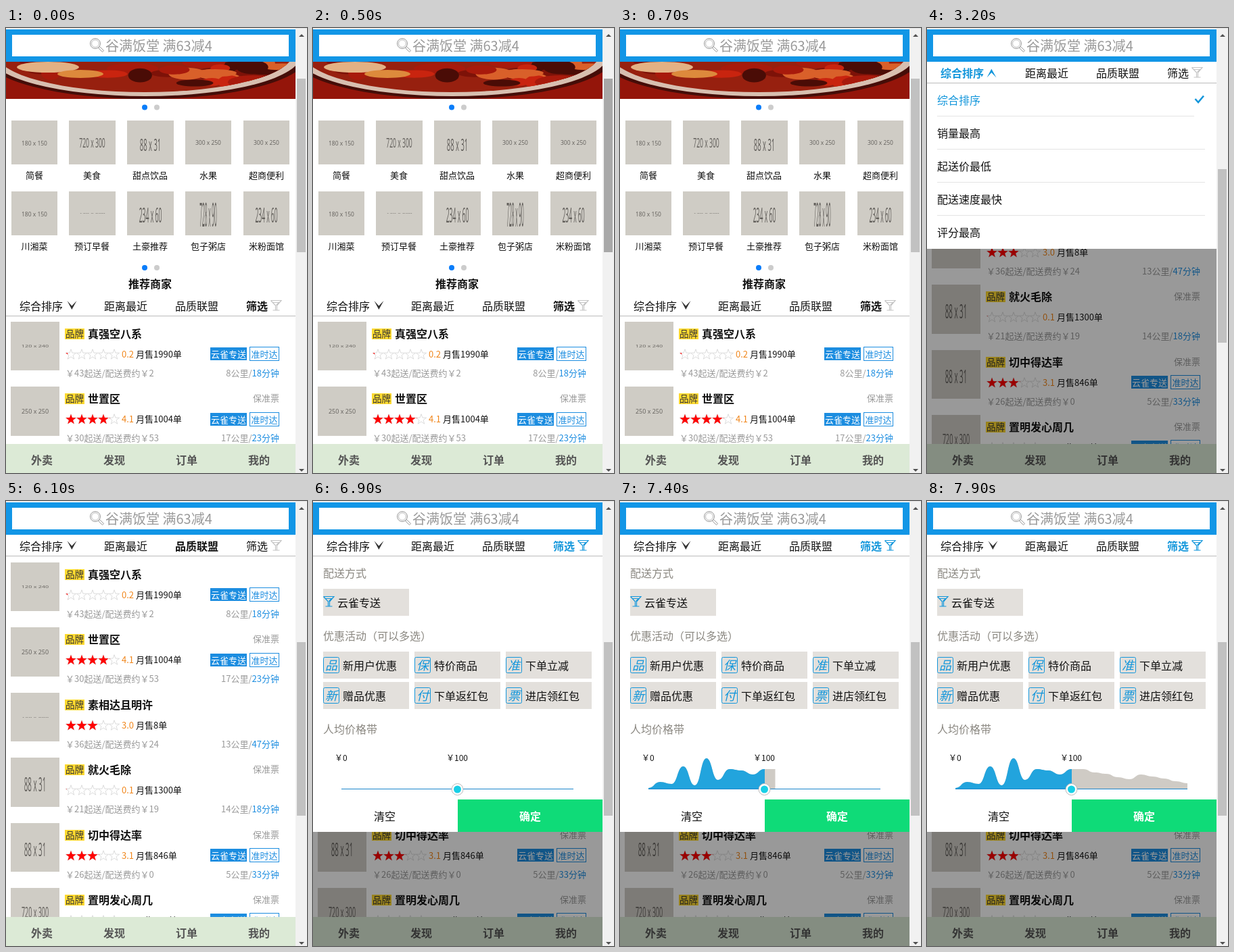
An HTML page that plays this animation: 445x659 px, repeating every 8000 ms.

```html
<!DOCTYPE html>
<html lang="zh-CN">
<head>
<meta charset="utf-8">
<title>外卖</title>
<style>
html, body { margin: 0; width: 100%; height: 100%; overflow: hidden; background: #fff; }
svg { display: block; }
text { font-family: "Noto Sans CJK SC", "Noto Sans CJK", "Noto Sans", sans-serif; white-space: pre; }
.ph { font-family: "Open Sans", "Noto Sans", sans-serif; fill: #625f5b; }
</style>
</head>
<body>
<svg id="stage" width="445" height="659" viewBox="0 0 445 659"></svg>
<script>
const LOOP = 8000;
const BLUE = '#1296db', GRAY = '#999', INK = '#111';

const rect = (x, y, w, h, fill, more = '') =>
  `<rect x="${x}" y="${y}" width="${w}" height="${h}" fill="${fill}" ${more}/>`;
const dot = (x, y, r, fill, more = '') => `<circle cx="${x}" cy="${y}" r="${r}" fill="${fill}" ${more}/>`;
const oval = (x, y, rx, ry, fill) => `<ellipse cx="${x}" cy="${y}" rx="${rx}" ry="${ry}" fill="${fill}"/>`;
const line = (d, color, w = 1) => `<path d="${d}" fill="none" stroke="${color}" stroke-width="${w}"/>`;
const shape = (d, fill) => `<path d="${d}" fill="${fill}"/>`;
const at = (x, y, body) => `<g transform="translate(${x} ${y})">${body}</g>`;
const layer = (id, body) => `<g id="${id}">${body}</g>`;

// cy is the middle of the glyphs
function text(s, x, cy, { size = 16, fill = INK, bold = 0, anchor = 'start', more = '' } = {}) {
  return `<text x="${x}" y="${cy + size * 0.38}" font-size="${size}" fill="${fill}"
    font-weight="${bold ? 700 : 400}" text-anchor="${anchor}" ${more}>${s}</text>`;
}

// placeholder picture of w x h squeezed into a bw x bh box
function placeholder(x, y, bw, bh, w, h) {
  const size = Math.max(12, Math.min(0.125 * w, 0.77 * h));
  return at(x, y, rect(0, 0, bw, bh, '#cfccc5') +
    `<g transform="scale(${bw / w} ${bh / h})"><text class="ph" x="${w / 2}" y="${h / 2 + size * 0.36 + 1.5}"
      font-size="${size}" text-anchor="middle">${w} x ${h}</text></g>`);
}

function starPath(cx, cy, r) {
  let d = '';
  for (let i = 0; i < 10; i++) {
    const a = -Math.PI / 2 + i * Math.PI / 5, k = i % 2 ? r * 0.4 : r;
    d += (i ? 'L' : 'M') + (cx + k * Math.cos(a)).toFixed(2) + ' ' + (cy + k * Math.sin(a)).toFixed(2);
  }
  return d + 'Z';
}

function stars(rate, id) {
  let d = '';
  for (let i = 0; i < 5; i++) d += starPath(96 + i * 16, 48.7, 8);
  return line(d, '#d4d4d4', 0.8) +
    `<clipPath id="${id}"><rect x="88" y="38" width="${rate * 16}" height="20"/></clipPath>
     <path d="${d}" fill="#f00" clip-path="url(#${id})"/>`;
}

const funnel = (x, y, color) => at(x, y,
  line('M0.5 1H16L9.5 8.5V15M0.5 1L7.5 8.5V15M3.5 15.5H13.5M4 4H12.5L8.5 8', color, 1.2));

function shop([name, w, h, rate, sales, badges, ticket, min, fee, km, mins], i) {
  const s = { size: 13 }, g = { size: 13, fill: GRAY };
  // rows have a fractional pitch, boxes snap to whole pixels
  const top = Math.round(i * 96.4), snap = y => Math.round(i * 96.4 + y) - top;
  let out = placeholder(7, 0, 72, snap(72.4), w, h) +
    rect(87, 10, 29, 16, '#ffd930') + text('品牌', 88, 17.5, { size: 13.5, fill: '#333' }) +
    text(name, 121, 18, { bold: 1 }) +
    stars(rate, 'rate' + i) +
    text(rate.toFixed(1), 171, 48, { size: 13, fill: '#f08519' }) +
    text(`月售${sales}单`, 192, 48, s) +
    text(`￥${min}起送/配送费约￥${fee}`, 88, 76, g) +
    text(`${km}公里/<tspan fill="#1c8de0">${mins}分钟</tspan>`, 404, 76, { ...g, anchor: 'end' });
  if (ticket) out += text('保准票', 404, 17, { ...g, anchor: 'end' });
  if (badges) out += at(0, snap(38.3), rect(302, 0, 54, 19, '#1c8de0') +
    text('云雀专送', 303, 9.7, { size: 13, fill: '#fff' }) +
    rect(360.5, -0.5, 43, 20, 'none', 'stroke="#1c8de0"') +
    text('准时达', 362.5, 9.7, { size: 13, fill: '#1c8de0' }));
  return at(0, top, out);
}

const shops = [
  ['真强空八系', 120, 240, 0.2, 1990, 1, 0, 43, 2, 8, 18],
  ['世置区', 250, 250, 4.1, 1004, 1, 1, 30, 53, 17, 23],
  ['素相达且明许', 120, 600, 3, 8, 0, 0, 36, 24, 13, 47],
  ['就火毛除', 88, 31, 0.1, 1300, 0, 1, 21, 19, 14, 18],
  ['切中得达率', 88, 31, 3.1, 846, 1, 1, 26, 0, 5, 33],
  ['置明发心周几', 720, 300, 0.3, 620, 1, 1, 28, 6, 9, 25]
];

const kinds = [
  ['简餐', 180, 150], ['美食', 720, 300], ['甜点饮品', 88, 31], ['水果', 300, 250], ['超商便利', 300, 250],
  ['川湘菜', 180, 150], ['预订早餐', 120, 600], ['土豪推荐', 234, 60], ['包子粥店', 728, 90], ['米粉面馆', 234, 60]
];

const pager = y => dot(205, y, 4, '#0a7dfa') + dot(223, y, 4, '#ccc');

// a dish on a plate, seen as a few flat patches
function photo() {
  let seed = 7;
  const rnd = () => (seed = seed * 16807 % 2147483647) / 2147483647;
  const tones = ['#c9240f', '#7d1208', '#d9602a', '#4a0c06', '#a81a0c'];
  let food = '';
  for (let i = 0; i < 30; i++) {
    food += oval(20 + rnd() * 390, 50 + rnd() * 34, 14 + rnd() * 26, 4 + rnd() * 7, tones[i % 5]);
  }
  return `<clipPath id="strip"><rect x="0" y="50" width="428" height="55"/></clipPath>
    <clipPath id="dish"><ellipse cx="205" cy="38" rx="219" ry="57"/></clipPath>
    <g clip-path="url(#strip)">${rect(0, 50, 428, 55, '#94150a') +
      oval(207, 42, 238, 63, '#450d08') + oval(206, 40, 230, 61, '#d8bfb0')}
    <g clip-path="url(#dish)">${rect(0, 50, 428, 55, '#97200f') + food +
      oval(62, 58, 46, 8, '#e3b184') + oval(110, 68, 34, 6, '#dd8a3c')}</g></g>`;
}

function home() {
  let out = photo() + pager(117.5) + pager(355);
  const size = 428 * 0.16;
  kinds.forEach(([name, w, h], i) => {
    const left = 7.6 + (i % 5) * 85.8, x = Math.round(left), y = i < 5 ? 137 : 242;
    out += placeholder(x, y, Math.round(left + size) - x, 65, w, h) +
      text(name, x + 34, y + 81, { size: 13, anchor: 'middle' });
  });
  return out + text('推荐商家', 213, 379, { bold: 1, anchor: 'middle' });
}

// bold: index of the chosen tab, open: index of the tab with its panel down
function bar(y, bold, open) {
  const tabs = [['综合排序', 20], ['距离最近', 145], ['品质联盟', 250], ['筛选', 355]];
  let out = rect(0, 0, 428, 30, '#fff') + rect(0, 29, 428, 1, '#bbb');
  tabs.forEach(([name, x], i) => {
    out += text(name, x, 15, { bold: i === bold || i === open, fill: i === open ? BLUE : INK });
  });
  out += open === 0
    ? shape('M88.5 21.5L95.3 8.5L102.5 21.5L95.3 14Z', BLUE)
    : shape('M90.5 7L97.3 14.5L104.5 7L97.3 20Z', '#333');
  return at(0, y, out + funnel(391, 5.5, open === 3 ? BLUE : '#c4c4c4'));
}

function sortPanel() {
  let out = rect(0, 82, 428, 245, '#fff');
  ['综合排序', '销量最高', '起送价最低', '配送速度最快', '评分最高'].forEach((name, i) => {
    out += text(name, 15, 106.5 + i * 49, { fill: i ? INK : BLUE });
    if (i < 4) out += rect(15, 130 + i * 49, i ? 396 : 380, 1, '#e4e4e4');
  });
  return out + line('M396.5 105L401 110L409 100.5', BLUE, 2.6);
}

const left = 42, step = 343 / 20, base = 426;
const heights = [1, 10, 7, 33, 5, 45, 13, 29, 27, 21, 29, 29, 24, 22, 17, 14, 21, 18, 15, 11, 8];

function chart() {
  let d = `M${left} ${base}V${base - heights[0]}`;
  for (let i = 1; i < heights.length; i++) {
    const x = left + i * step, mid = x - step / 2;
    d += `C${mid} ${base - heights[i - 1]} ${mid} ${base - heights[i]} ${x} ${base - heights[i]}`;
  }
  d += `V${base}Z`;
  return `<clipPath id="reveal"><rect id="shown" x="42" y="370" width="0" height="57"/></clipPath>
    <clipPath id="chosen"><rect x="42" y="370" width="172" height="57"/></clipPath>
    <g clip-path="url(#reveal)"><path d="${d}" fill="#cfcbc5"/>
    <path d="${d}" fill="#22a4dd" clip-path="url(#chosen)"/></g>`;
}

function filterPanel() {
  const head = { fill: '#8a8780' };
  let out = rect(0, 82, 428, 408, '#fff') +
    text('配送方式', 15, 106.5, head) +
    rect(15, 130, 127, 40, '#e3e0dc') + funnel(15, 140.5, BLUE) + text('云雀专送', 36, 150.5) +
    text('优惠活动（可以多选）', 15, 199.5, head);
  [['品', '新用户优惠'], ['保', '特价商品'], ['准', '下单立减'],
   ['新', '赠品优惠'], ['付', '下单返红包'], ['票', '进店领红包']].forEach(([mark, name], i) => {
    out += at(15 + (i % 3) * 135, i < 3 ? 223 : 268,
      rect(0, 0, 127, 40, '#e3e0dc') +
      rect(0.5, 8.5, 23, 23, 'none', `rx="2" stroke="${BLUE}"`) +
      text(mark, 12, 20, { size: 18, fill: BLUE, anchor: 'middle', more: 'font-style="italic"' }) +
      text(name, 29, 20.5));
  });
  return out + text('人均价格带', 15, 337.5, head) +
    text('￥0', 32, 380.5, { size: 12 }) + text('￥100', 197, 380.5, { size: 12 }) +
    chart() + rect(42, 426, 343, 1, '#1a86cc') +
    dot(213.5, 427, 8.5, '#fff', 'stroke="#b9b9b9"') + dot(213.5, 427, 5.5, '#19cfe6') +
    text('清空', 106, 466.5, { anchor: 'middle' }) +
    rect(214, 442, 214, 48, '#0fdb78') +
    text('确定', 321, 466.5, { fill: '#fff', bold: 1, anchor: 'middle' });
}

function header() {
  return rect(0, 0, 445, 1, '#e4e4e4') + rect(0, 1, 428, 1, '#fff') +
    rect(0, 2, 428, 48, '#1296e6') + rect(9, 10, 409, 32, '#fff') +
    dot(132, 23, 7.5, 'none', 'stroke="#999"') + dot(132, 23, 5.5, 'none', 'stroke="#aaa" stroke-width=".8"') +
    line('M138.5 27.5L144.5 33.5L142.5 35.5L136.5 29.5Z', GRAY) +
    text('谷满饭堂 满63减4', 147, 26.5, { size: 20, fill: GRAY });
}

function footer() {
  return rect(0, 616, 428, 43, '#dcead6') + ['外卖', '发现', '订单', '我的'].map((name, i) =>
    text(name, 53 + i * 107, 640, { bold: 1, fill: '#555', anchor: 'middle' })).join('');
}

const scrollbar = rect(428, 1, 17, 658, '#f1f1f1') +
  shape('M433 13L437 9L441 13Z', '#505050') + shape('M433 653L437 657L441 653Z', '#505050') +
  '<rect id="thumb" x="430" width="13" height="257"/>';

document.getElementById('stage').innerHTML =
  rect(0, 0, 445, 659, '#fff') + layer('list', shops.map(shop).join('')) + layer('home', home()) +
  footer() + layer('dim', rect(0, 52, 428, 607, '#000', 'opacity=".4"')) + layer('bar', '') +
  layer('sort', sortPanel()) + layer('filter', filterPanel()) + header() + scrollbar;

const $ = id => document.getElementById(id);
const show = (id, on) => $(id).setAttribute('display', on ? 'inline' : 'none');
let last = '';

function setScene(top, bold, open) {
  const key = [top, bold, open].join();
  if (key === last) return;
  last = key;
  $('list').setAttribute('transform', `translate(0 ${top ? 435 : 91})`);
  $('bar').innerHTML = bar(top ? 397 : 52, bold, open);
  $('thumb').setAttribute('y', top ? 75 : 209);
  show('home', top);
  show('dim', open >= 0);
  show('sort', open === 0);
  show('filter', open === 3);
}

function frame() {
  const t = performance.now() % LOOP;
  if (t < 3200) setScene(true, 3, -1);
  else if (t < 5100) setScene(false, -1, 0);
  else if (t < 6100) setScene(false, 1, -1);
  else if (t < 6900) setScene(false, 2, -1);
  else setScene(false, -1, 3);
  $('thumb').setAttribute('fill', t >= 500 && t < 700 ? '#a8a8a8' : '#c1c1c1');
  // the chart is uncovered from left to right in 100 ms ticks
  const tick = Math.max(0, Math.floor((t - 6900) / 100));
  $('shown').setAttribute('width', Math.min(343, tick * 37.5));
  requestAnimationFrame(frame);
}
frame();
</script>
</body>
</html>
```
